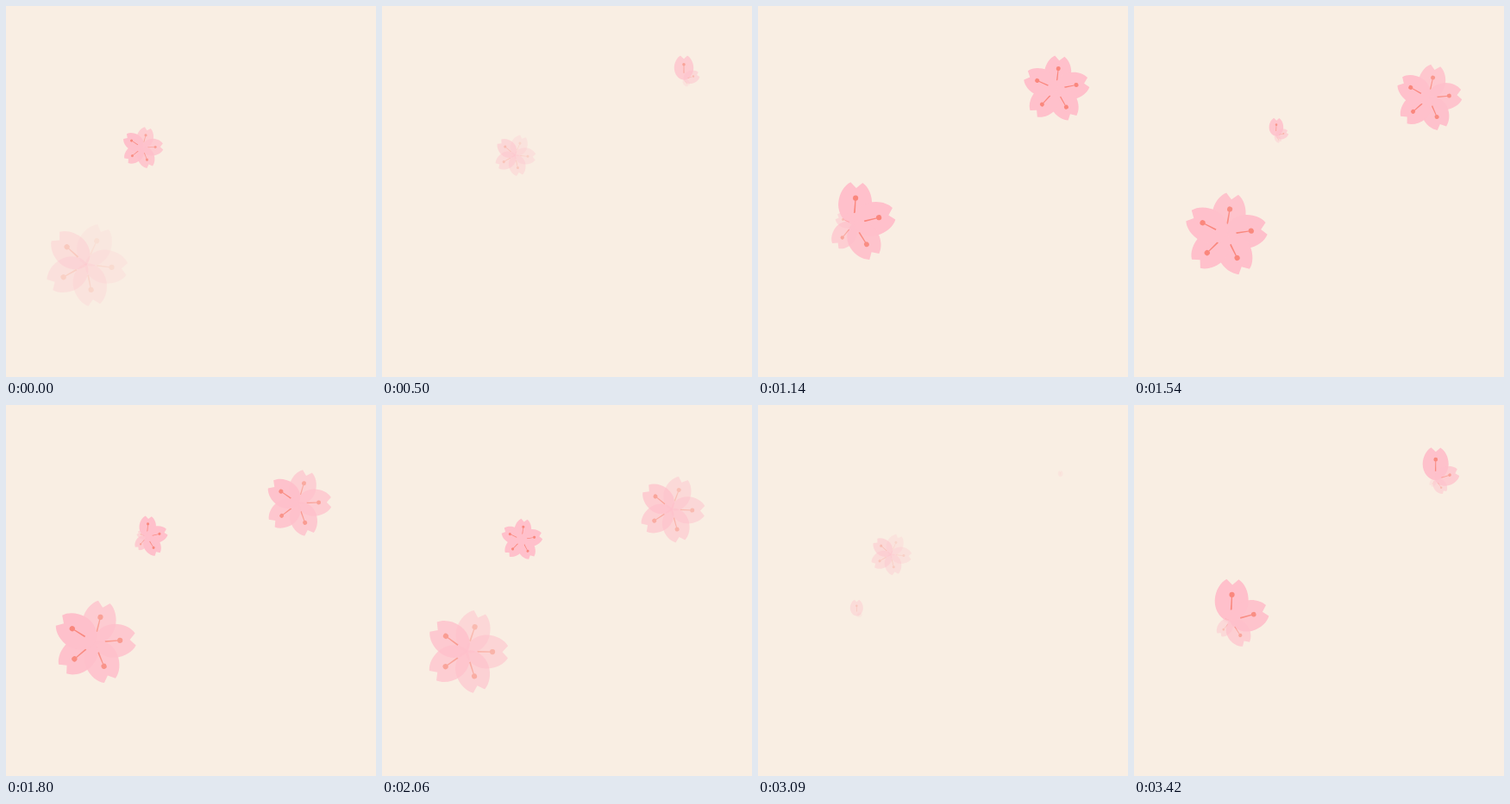
Recreate the animation shown at these times as an HTML page. Size 429 by 430 pixels, loop 3.47 s.

```html
<!DOCTYPE html>
<html lang="en">
<head>
<meta charset="utf-8">
<title>Cherry blossoms</title>
<style>
  html, body { margin: 0; width: 100%; height: 100%; overflow: hidden; background: #f9eee3; }
  svg { display: block; width: 100%; height: 100%; }
</style>
</head>
<body>
<svg id="stage" viewBox="0 0 429 430">
  <defs>
    <g id="petal">
      <path fill="#ffc0cb" d="M0 1C-10 1-19.5-10-19.5-23C-19.5-34-14-44-7-48L0-41.5L7-48C14-44 19.5-34 19.5-23C19.5-10 10 1 0 1Z"/>
      <path fill="#fa877d" d="M-.6-29L-.9-12.5H.9L.6-29Z"/>
      <circle fill="#fa877d" cy="-30" r="3.1"/>
    </g>
  </defs>
</svg>
<script>
const LOOP = 3470;
const GROW = 426, STAGGER = 102;
const NS = 'http://www.w3.org/2000/svg';
const stage = document.getElementById('stage');

// start and period in ms; dx, dy, turn are the drift per unit of drift()
const flowers = [
  { size: 1, start: 540, period: 2387, x: 115, y: 242.5, dx: -18.4, dy: 47, angle: -0.5, turn: 20.7 },
  { size: 0.5, start: 1178, period: 2575, x: 165.4, y: 148.4, dx: -9, dy: 19.5, angle: 0.5, turn: 18 },
  { size: 0.8, start: 194, period: 2817, x: 351, y: 82.6, dx: -12.4, dy: 31.2, angle: -1.5, turn: 18 }
];

const clamp = v => Math.min(1, Math.max(0, v));
const drift = age => 1 - Math.cos(Math.PI / 2 * (age + 140) / 1750);

function add(parent, tag) {
  return parent.appendChild(document.createElementNS(NS, tag));
}

for (const f of flowers) {
  f.group = add(stage, 'g');
  f.petals = Array.from({ length: 5 }, () => {
    const petal = add(f.group, 'use');
    petal.setAttribute('href', '#petal');
    return petal;
  });
}

// Petals start to fade one after another and vanish almost together.
function fade(age, i) {
  const from = 830 + 105 * i, to = 1960 + 25 * i;
  return 1 - clamp((age - from) / (to - from)) ** 1.4;
}

function drawFlower(f, time) {
  const age = ((time - f.start) % f.period + f.period) % f.period;
  const slow = f.period / flowers[0].period;
  const d = drift(age);
  f.group.setAttribute('transform',
    `translate(${f.x + f.dx * d} ${f.y + f.dy * d}) rotate(${f.angle + f.turn * d}) scale(${f.size})`);
  f.petals.forEach((petal, i) => {
    const grown = clamp((age - i * STAGGER) / GROW);
    petal.setAttribute('transform', `rotate(${72 * i}) scale(${grown})`);
    petal.setAttribute('opacity', grown * fade(age / slow, i));
  });
}

function frame() {
  const time = performance.now() % LOOP;
  flowers.forEach(f => drawFlower(f, time));
  requestAnimationFrame(frame);
}
frame();
</script>
</body>
</html>
```
